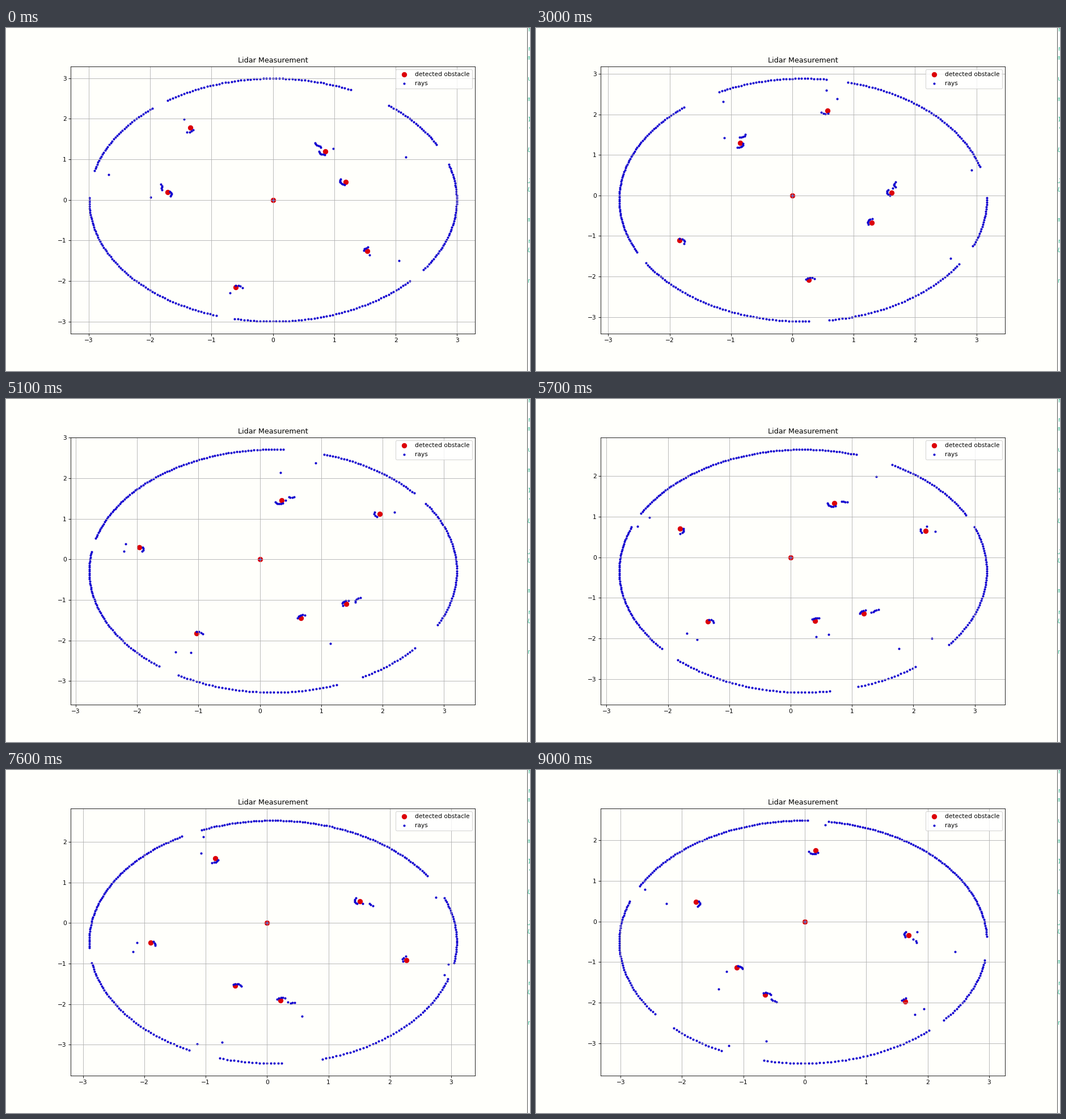
Write a matplotlib script that moves like this. It is 924 px wide and 606 px high and loops after 9.2 s.

```python
import numpy as np
import matplotlib.pyplot as plt
from matplotlib.animation import FuncAnimation
from matplotlib.patches import Rectangle

W, H, DPI = 924, 606, 230 / 3
FRAMES, INTERVAL = 92, 100
PAPER, RED, BLUE = "#fffffb", "#dc0009", "#1000cf"

# World: a round arena holding six posts, two of them with a neighbour.
WALL = 2.995
POST = 0.093
POSTS = np.array([(-1.39, 1.765), (0.84, 1.21), (1.185, 0.47),
                  (-1.745, 0.145), (1.57, -1.257), (-0.585, -2.195)])
NEIGHBOURS = np.array([(0.78, 1.42), (-1.90, 0.335)])
PIVOT = np.array([-0.038, -0.2505])  # turning centre, fixed to the robot
BIAS = np.array([0.004, 0.015])      # offset of the detections

# Scan updates start at tick 9 and skip a few ticks.
PAUSES = {11, 15, 19, 31, 37, 41, 44, 47, 50, 55, 58, 64, 72, 74, 77, 83, 88}
TURN_STEPS = [0, 8, 19, 34, 45, 54, 65]
TURN_ANGLES = [0, 22.5, 47.8, 89, 116.3, 139.5, 169.4]

BEARINGS = np.radians(np.arange(360))
BEAM = np.radians(np.linspace(-0.4, 0.4, 9))


def turn_at(tick):
    steps = sum(n not in PAUSES for n in range(9, min(tick, 90) + 1))
    return -np.radians(np.interp(steps, TURN_STEPS, TURN_ANGLES))


def to_robot(points, turn):
    c, s = np.cos(turn), np.sin(turn)
    return (points - PIVOT) @ np.array([[c, s], [-s, c]]) + PIVOT


def cast(dirs, center, radius, inside=False):
    along = dirs @ center
    disc = radius ** 2 - center @ center + along ** 2
    root = np.sqrt(np.maximum(disc, 0))
    if inside:
        return along + root
    return np.where((disc > 0) & (along > 0), along - root, np.inf)


def scan(turn):
    # Each beam averages a narrow fan, so edges give in-between ranges.
    fan = BEARINGS[:, None] + BEAM
    dirs = np.stack([np.cos(fan), np.sin(fan)], axis=-1)
    dist = cast(dirs, to_robot(np.zeros(2), turn), WALL, inside=True)
    for center in to_robot(np.vstack([POSTS, NEIGHBOURS]), turn):
        dist = np.minimum(dist, cast(dirs, center, POST))
    reach = dist.mean(axis=1)[:, None]
    hits = reach * np.column_stack([np.cos(BEARINGS), np.sin(BEARINGS)])
    return np.vstack([hits, (0, 0)])


def detect(turn):
    found = [(0, 0)]
    for x, y in to_robot(POSTS, turn):
        r = np.hypot(x, y)
        # A cluster split by the start of the scan is missed.
        if abs(np.arctan2(y, x)) < 0.7 * np.arcsin(POST / r):
            continue
        inward, clockwise = np.array([-x, -y]) / r, np.array([y, -x]) / r
        found.append((x, y) + 0.03 * clockwise + 0.02 * inward + BIAS)
    return np.array(found)


def padded(values):
    lo, hi = values.min(), values.max()
    pad = 0.05 * (hi - lo)
    return lo - pad, hi + pad


plt.rcParams["font.family"] = "DejaVu Sans"
fig = plt.figure(figsize=((W + 1e-6) / DPI, (H + 1e-6) / DPI), dpi=DPI,
                 facecolor=PAPER)
ax = fig.add_axes([114.2 / W, 66.2 / H, 713 / W, 472.1 / H], facecolor=PAPER)
ax.set_title("Lidar Measurement")
ax.grid(True)
obstacles = ax.scatter([0], [0], s=60, color=RED, label="detected obstacle")
rays = ax.scatter([0], [0], s=8, color=BLUE, label="rays")
ax.legend(loc="upper right")

# Sliver of a neighbouring text window at the right edge.
fig.add_artist(Rectangle((919 / W, 0), 1 / W, 1, color="#555555", lw=0))
fig.add_artist(Rectangle((920 / W, 0), 4 / W, 1, color="#fefefe", lw=0))
SLIVER = [(2, "r"), (36, "r"), (52, "m"), (89, "u"), (125, "m"), (161, "1"),
          (178, "'"), (215, "U"), (270, "J"), (285, "U"), (338, "m"),
          (376, "r"), (392, "U"), (446, "n")]
for y, letter in SLIVER:
    fig.text(919.5 / W, 1 - (y + 4) / H, letter, color="#3fbf95", fontsize=10,
             family="DejaVu Sans Mono", style="italic" if letter in "UJ" else "normal")


def draw(tick):
    turn = turn_at(tick)
    points, found = scan(turn), detect(turn)
    rays.set_offsets(points)
    obstacles.set_offsets(found)
    ax.set_xlim(padded(points[:, 0]))
    ax.set_ylim(padded(points[:, 1]))
    return rays, obstacles


anim = FuncAnimation(fig, draw, frames=FRAMES, interval=INTERVAL,
                     repeat=True, repeat_delay=0, blit=False)
plt.show()
```
